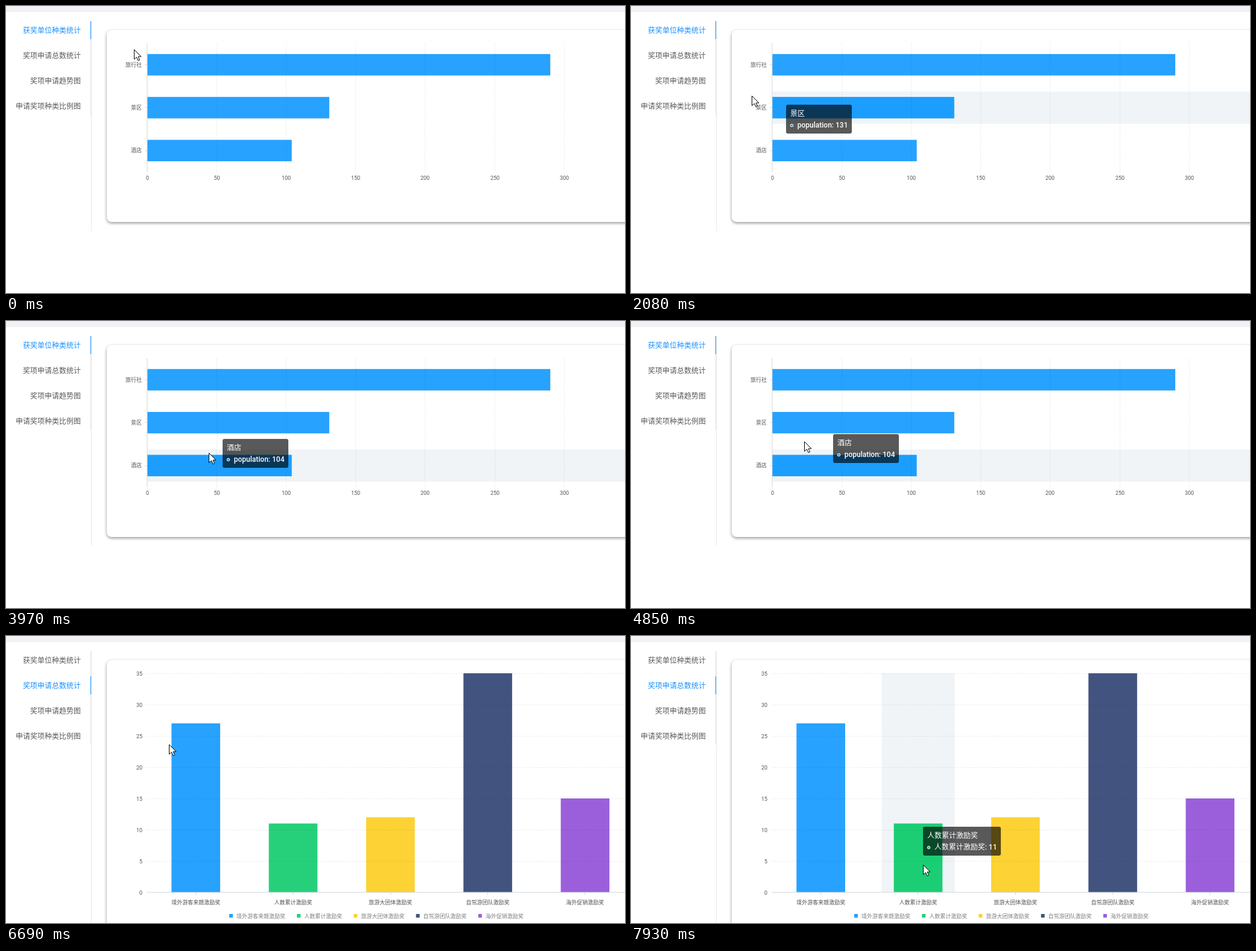
These frames come from a looping animation (1026 by 477 pixels, 8000 ms). An HTML page with a canvas:

```html
<!DOCTYPE html>
<html lang="zh">
<head>
<meta charset="utf-8">
<style>
html, body { margin: 0; width: 100%; height: 100%; overflow: hidden; background: #fff; }
canvas { display: block; }
</style>
</head>
<body>
<canvas id="stage" width="1026" height="477"></canvas>
<script>
const ctx = document.getElementById('stage').getContext('2d');
// After a pause the screen refreshes in even steps
const LOOP = 8000, PAUSE = 880, STEP = 110.16;
const CHART_SWITCH = 43, INK_FROM = 44, INK_TO = 47;
const FONT = 'Roboto, "Noto Sans CJK SC", "Noto Sans CJK", sans-serif';
const BLUE = '#1890ff', LABEL = '#545454', LEFT = 234, TOP = 62;

const tabs = ['获奖单位种类统计', '奖项申请总数统计', '奖项申请趋势图', '申请奖项种类比例图'];
const units = [['旅行社', 290], ['景区', 131], ['酒店', 104]];
const awards = [
  ['境外游客来赣激励奖', 27, '#1c9efe'],
  ['人数累计激励奖', 11, '#1bce74'],
  ['旅游大团体激励奖', 12, '#fdd02a'],
  ['自驾游团队激励奖', 35, '#384a79'],
  ['海外促销激励奖', 15, '#9657da']
];

// Turning points of the pointer: step, x, y
const path = [
  [0, 212, 72], [1, 236, 70], [5, 250, 235], [10, 237, 188], [11, 200, 149],
  [12, 184, 112], [13, 240, 98], [20, 316, 186], [21, 330, 168], [25, 345, 222],
  [35, 315, 212], [36, 287, 200], [39, 167, 135], [42, 82, 76], [46, 82, 76],
  [54, 333, 214], [57, 346, 225], [58, 364, 194], [63, 464, 341], [64, 484, 380]
];

const arrow = new Path2D('M0 0V16L4 12.6L6.5 18.3L9 17.2L6.6 11.6H11.5Z');
const hand = new Path2D('M-2 14V2Q-2 0 0 0Q1.5 0 1.5 2V7Q2 6 3.5 6Q4.8 6 5 7.5Q5.5 6.7 6.8 7' +
  'Q8 7 8.2 8.6Q9 8 10 8.4Q11 8.8 11 10V15Q11 19 9 21Q7 23 4 23Q1 23 0 21Q-3 18 -5.5 14' +
  'Q-6.5 12 -5 11.5Q-3.5 11.3 -2 14ZM1.5 7V11M5 8V11M8.2 9V11');

function pointerAt(step) {
  const next = path.findIndex(k => k[0] > step);
  if (next < 0) return path.at(-1).slice(1);
  const [a, x, y] = path[Math.max(0, next - 1)], [b, u, v] = path[next];
  const p = Math.max(0, (step - a) / (b - a));
  return [Math.round(x + (u - x) * p), Math.round(y + (v - y) * p)];
}

function rect(x, y, w, h, color, alpha = 1) {
  ctx.globalAlpha = alpha;
  ctx.fillStyle = color;
  ctx.fillRect(x, y, w, h);
  ctx.globalAlpha = 1;
}

function text(s, x, y, size, color, align = 'left', weight = 400) {
  ctx.font = `${weight} ${size}px ${FONT}`;
  ctx.textAlign = align;
  ctx.fillStyle = color;
  ctx.fillText(s, x, y);
}

function line(x1, y1, x2, y2, color, dash = []) {
  ctx.strokeStyle = color;
  ctx.lineWidth = 1;
  ctx.setLineDash(dash);
  ctx.beginPath();
  ctx.moveTo(x1, y1);
  ctx.lineTo(x2, y2);
  ctx.stroke();
  ctx.setLineDash([]);
}

const gridLine = (...ends) => line(...ends, 'rgba(0,0,0,.09)', [2, 2]);
const crisp = v => Math.floor(v) + .5;

function card(bottom) {
  ctx.save();
  ctx.shadowColor = 'rgba(0,0,0,.42)';
  ctx.shadowBlur = 5;
  ctx.shadowOffsetY = 2;
  ctx.fillStyle = '#fff';
  ctx.beginPath();
  ctx.roundRect(167, 40, 900, bottom - 40, 8);
  ctx.fill();
  ctx.restore();
}

function menu(step, bottom, hover) {
  const p = Math.min(1, Math.max(0, (step - INK_FROM) / (INK_TO - INK_FROM)));
  rect(141, 25, 1, bottom - 25, '#e8e8e8');
  rect(140, 25, 1, 156, '#e8e8e8');
  rect(140, 25 + 42 * p * p * (3 - 2 * p), 1, 30, BLUE);
  tabs.forEach((name, i) => {
    const lit = i === Math.floor(p) || i === 1 && hover;
    text(name, 124, 41 + 42 * i, 12, lit ? BLUE : '#595959', 'right');
  });
}

const unitChart = {
  data: units, bin: 71.3, bottom: 276, cardBottom: 359, menuBottom: 374,
  index(x, y) { return Math.floor((y - TOP) / this.bin); },
  draw(on) {
    const { bin, bottom } = this, scale = 2.304;
    units.forEach(([name, value], i) => {
      const y = TOP + bin * (i + .5);
      if (i === on) rect(LEFT, y - bin * .375, 800, bin * .75, '#f0f4f7');
      rect(LEFT, y - bin / 4, value * scale, bin / 2, awards[0][2], i === on ? 1 : .95);
      text(name, 225, y + .5, 9, LABEL, 'right');
      line(230, crisp(y), LEFT, crisp(y), '#d9d9d9');
    });
    for (let v = 0; v <= 300; v += 50) {
      const x = crisp(LEFT + v * scale);
      if (v) gridLine(x, TOP, x, bottom);
      text(v, x, 286, 9, LABEL, 'center');
    }
    line(LEFT, TOP, LEFT, bottom, '#d5d5d5');
  }
};

const awardChart = {
  data: awards, bin: 161.3, bottom: 426, cardBottom: 520, menuBottom: 477,
  index(x) { return Math.floor((x - LEFT) / this.bin); },
  draw(on) {
    const { bin, bottom } = this, scale = 10.4;
    let legendX = 370;
    awards.forEach(([name, value, color], i) => {
      const x = LEFT + bin * (i + .5), height = value * scale;
      if (i === on) rect(x - bin * .375, TOP, bin * .75, bottom - TOP, '#f0f4f7');
      rect(x - bin / 4, bottom - height, bin / 2, height, color, i === on ? 1 : .95);
      text(name, x, 443, 9, LABEL, 'center');
      line(crisp(x), bottom, crisp(x), bottom + 4, '#ccd6dc');
      rect(legendX, 462, 6, 6, color, .95);
      text(name, legendX + 12, 466, 9, '#808080');
      legendX += name.length * 9 + 31.2;
    });
    for (let v = 0; v <= 35; v += 5) {
      const y = crisp(bottom - v * scale);
      if (v) gridLine(LEFT, y, 1026, y);
      text(v, 226, y + .5, 9, LABEL, 'right');
    }
    line(LEFT, bottom, 1026, bottom, '#c8d4da');
  }
};

function drawTip(x, y, title, label, color) {
  ctx.font = `500 12px ${FONT}`;
  const width = Math.round(ctx.measureText(label).width + 25.3);
  ctx.fillStyle = 'rgba(0,0,0,.65)';
  ctx.beginPath();
  ctx.roundRect(x, y, width, 48, 3);
  ctx.fill();
  text(title, x + 7, y + 15, 12, '#fff', 'left', 500);
  text(label, x + 18.7, y + 34, 12, '#fff', 'left', 500);
  ctx.beginPath();
  ctx.arc(x + 9.5, y + 34.5, 2.3, 0, 7);
  ctx.fillStyle = color;
  ctx.fill();
  ctx.strokeStyle = '#fff';
  ctx.stroke();
}

function drawPointer(x, y, shape) {
  ctx.save();
  ctx.translate(x + .5, y + .5);
  ctx.fillStyle = '#fff';
  ctx.strokeStyle = '#000';
  ctx.fill(shape);
  ctx.stroke(shape);
  ctx.restore();
}

function draw(time) {
  const step = Math.max(0, Math.floor((time - PAUSE) / STEP + 1.2) - 1);
  const shown = time < PAUSE ? 0 : step;
  const chart = shown < CHART_SWITCH ? unitChart : awardChart;
  const [x, y] = pointerAt(shown);
  const hover = x > 28 && x < 124 && y > 70 && y < 96;

  ctx.textBaseline = 'middle';
  rect(0, 0, 1026, 477, '#fff');
  rect(0, 0, 1026, 10, '#f0f2f5');
  menu(shown, chart.menuBottom, hover);
  card(chart.cardBottom);

  // The tooltip trails the pointer by one step, the highlight by two
  const [tipX, tipY] = pointerAt(shown - 1), [markX, markY] = pointerAt(shown - 2);
  const inside = markX >= LEFT && markY >= TOP && markY < chart.bottom;
  const on = inside ? chart.index(markX, markY) : -1;
  chart.draw(on);
  if (inside) {
    const [name, value, color = awards[0][2]] = chart.data[on];
    const label = `${chart === unitChart ? 'population' : name}: ${value}`;
    drawTip(tipX + 20, tipY - 24, name, label, color);
  }
  drawPointer(x, y, hover ? hand : arrow);
}

const start = performance.now();
(function tick() {
  draw((performance.now() - start) % LOOP);
  requestAnimationFrame(tick);
})();
</script>
</body>
</html>
```
